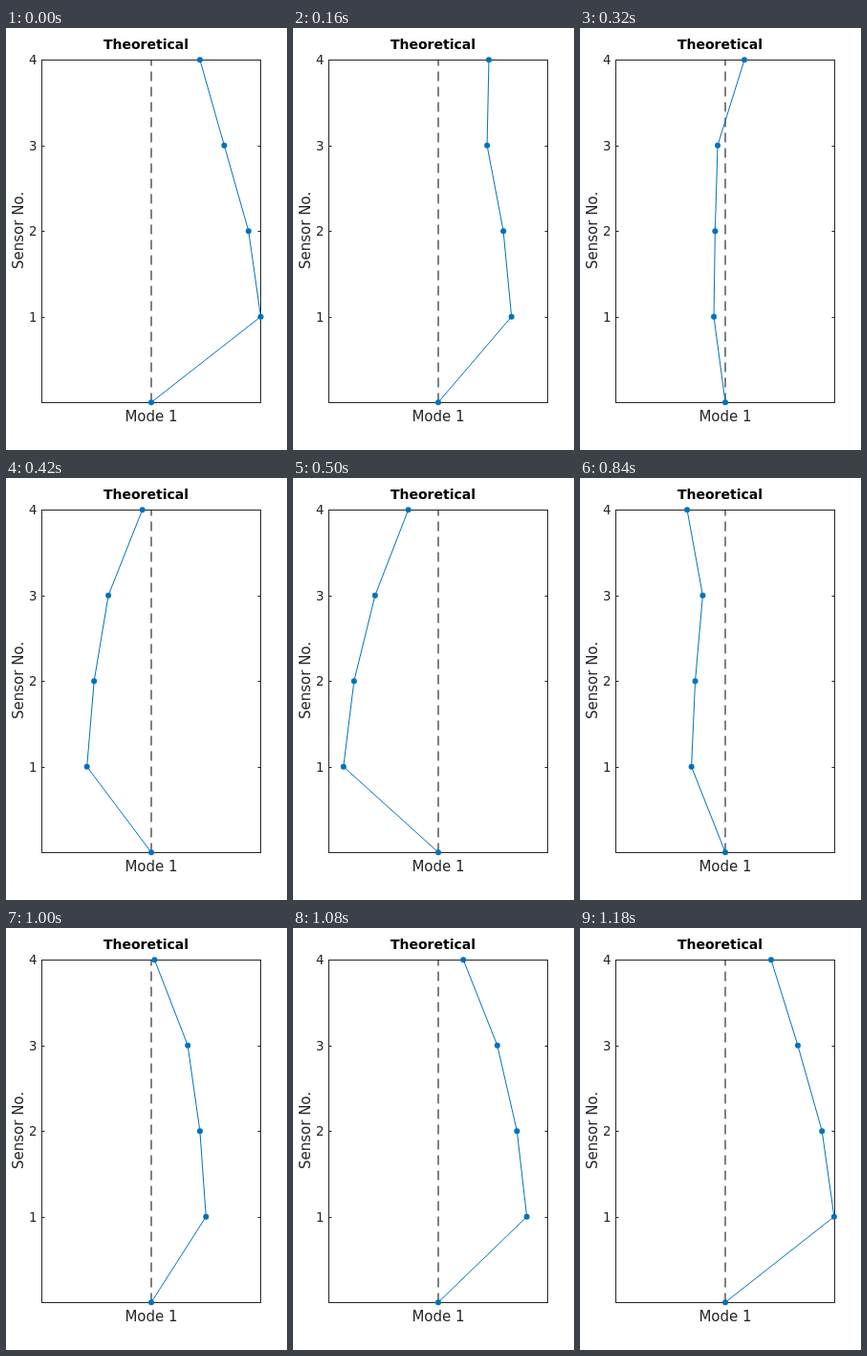
Write an HTML page with a canvas that moves like this. It is 294x441 px and loops after 1.2 s.

```html
<!DOCTYPE html>
<html lang="en">
<head>
<meta charset="utf-8">
<title>Mode shape</title>
<style>
  html, body { margin: 0; width: 100%; height: 100%; overflow: hidden; background: #fff; }
  canvas { display: block; width: 294px; height: 441px; }
</style>
</head>
<body>
<canvas id="stage" width="294" height="441"></canvas>
<script>
const ctx = document.getElementById("stage").getContext("2d");
const LOOP = 1200, STEP = 20;
const LEFT = 37.5, RIGHT = 266.5, TOP = 33.5, BOTTOM = 391.5;
const CENTER = (LEFT + RIGHT) / 2, HALF = (RIGHT - LEFT) / 2;
const INK = "#262626", BLUE = "#0072bd";

// Cosine and sine weight of each sensor, from the base upwards.
const SENSORS = [[0, 0], [1, 0], [8 / 9, 0], [2 / 3, 0], [4 / 9, 2 / 9]];

const sensorY = n => BOTTOM - n * (BOTTOM - TOP) / 4;

function text(str, x, y, font, align = "center", color = INK) {
  ctx.font = font + ' "DejaVu Sans", sans-serif';
  ctx.textAlign = align;
  ctx.fillStyle = color;
  ctx.fillText(str, x, y);
}

function path(points, color) {
  ctx.strokeStyle = color;
  ctx.beginPath();
  points.forEach(([x, y]) => ctx.lineTo(x, y));
  ctx.stroke();
}

function drawAxes() {
  ctx.strokeStyle = INK;
  ctx.strokeRect(LEFT, TOP, RIGHT - LEFT, BOTTOM - TOP);
  for (let n = 1; n <= 4; n++) {
    const y = Math.floor(sensorY(n)) + 0.5;
    path([[LEFT, y], [LEFT + 3, y]], INK);
    path([[RIGHT - 3, y], [RIGHT, y]], INK);
    text(n, 32.5, y + 4.5, "13.33px", "right");
  }
  text("Theoretical", 146.5, 22, "bold 14px", "center", "#000");
  text("Mode 1", CENTER, 411, "15px");
  ctx.save();
  ctx.translate(18, 211.5);
  ctx.rotate(-Math.PI / 2);
  text("Sensor No.", 0, 0, "15px");
  ctx.restore();

  ctx.setLineDash([10, 6]);
  path([[CENTER, BOTTOM], [CENTER, TOP]], "#000");
  ctx.setLineDash([]);
}

function drawMode(time) {
  const angle = 2 * Math.PI * time / LOOP;
  const points = SENSORS.map(([c, s], n) => [
    CENTER + HALF * (c * Math.cos(angle) + s * Math.sin(angle)),
    sensorY(n) - 0.3
  ]);
  path(points, BLUE);
  ctx.fillStyle = BLUE;
  for (const [x, y] of points) {
    ctx.beginPath();
    ctx.arc(x, y, 3, 0, 2 * Math.PI);
    ctx.fill();
  }
}

function render(now) {
  const time = Math.floor((now % LOOP) / STEP) * STEP;
  ctx.fillStyle = "#fff";
  ctx.fillRect(0, 0, 294, 441);
  ctx.lineWidth = 1;
  drawAxes();
  drawMode(time);
}

let start;
function tick(now) {
  start ??= now;
  render(now - start);
  requestAnimationFrame(tick);
}
render(0);
requestAnimationFrame(tick);
</script>
</body>
</html>
```
